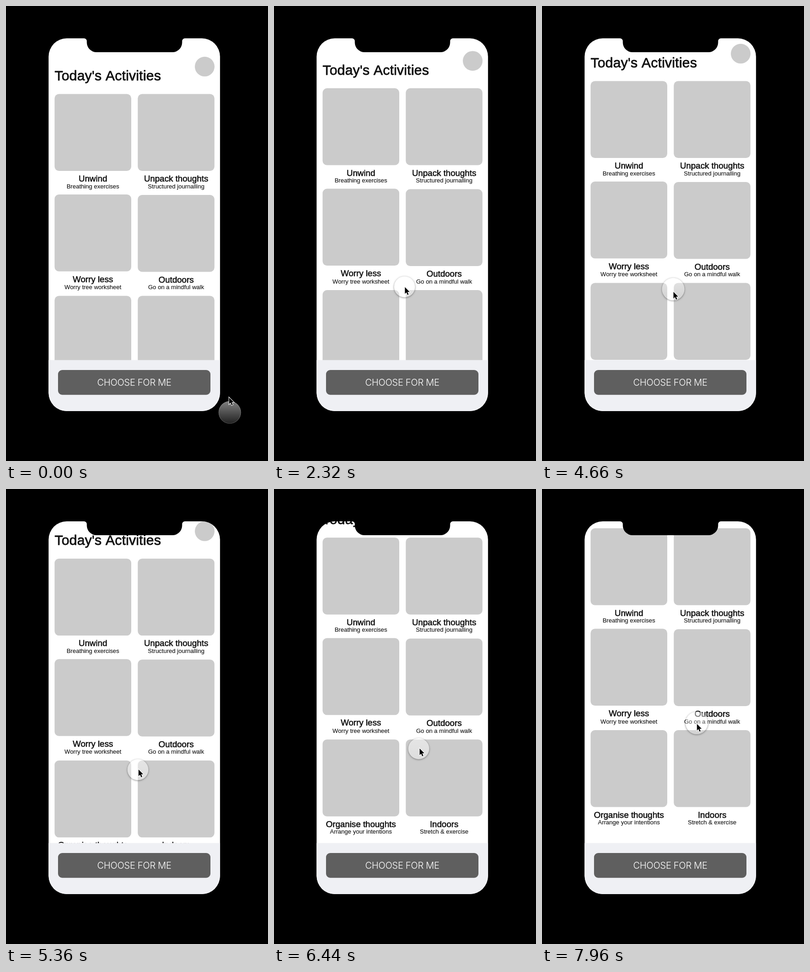
An HTML page with a canvas for the animation above (8000 ms loop, 569 px wide and 985 px high).

```html
<!DOCTYPE html>
<html lang="en">
<head>
<meta charset="utf-8">
<title>Today's Activities</title>
<style>
  html, body { margin: 0; width: 100%; height: 100%; overflow: hidden; background: #000; }
  canvas { display: block; width: 569px; height: 985px; }
</style>
</head>
<body>
<canvas id="stage"></canvas>
<script>
const W = 569, H = 985, LOOP = 8000;
const canvas = document.getElementById('stage');
const ctx = canvas.getContext('2d');
const dpr = window.devicePixelRatio || 1;
canvas.width = W * dpr;
canvas.height = H * dpr;

const GREY = '#cbcbcb', INK = '#111';
const SANS = '"Liberation Sans", Arial, sans-serif';
const ROW = 218.5, CARD = 166.5, TOP = 190.5;
const LAG = 60; // the touch dot trails the pointer by this many ms

const clamp = p => Math.max(0, Math.min(1, p));
const smooth = p => p * p * (3 - 2 * p);
const easeOut = p => p * (2 - p);
const mix = (a, b, p) => a + (b - a) * p;

// Pointer moves after it has arrived; drags take the page along
const MOVES = [
  { at: 1780, ms: 960, dx: 3, dy: -22, drag: true },
  { at: 3560, ms: 340, dx: 0, dy: -6, drag: true },
  { at: 4480, ms: 200, dx: 0, dy: 26 },
  { at: 5080, ms: 1840, dx: 37, dy: -77.5, drag: true },
  { at: 7700, ms: 200, dx: 14, dy: -33 }
];

function pointer(t) {
  // Arrival: a quarter arc that rises first, then swings left
  let x = 283 + 204 * (1 - smooth(clamp((t + LAG) / 1040)));
  let y = 621 + 227 * (1 - Math.min(1, t / 820)) ** 2;
  for (const { at, ms, dx, dy, drag } of MOVES) {
    const p = clamp((t - at) / ms);
    x += dx * smooth(p);
    y += dy * (drag ? p : easeOut(p));
  }
  return { x, y };
}

const scrollY = t => MOVES.filter(m => m.drag)
  .reduce((sum, m) => sum + m.dy * clamp((t - m.at) / m.ms), 0);

// 0 when hovering, 1 when held down
const ramp = (t, at) => clamp((t - at) / 40 + 1);
const press = t => ramp(t, 1400) - ramp(t, 4520) + ramp(t, 4840) - ramp(t, 7200);

const LEFT = [
  ['Unwind', 'Breathing exercises'],
  ['Worry less', 'Worry tree worksheet', -1],
  ['Organise thoughts', 'Arrange your intentions']
];
const RIGHT = [
  ['Unpack thoughts', 'Structured journalling'],
  ['Outdoors', 'Go on a mindful walk'],
  ['Indoors', 'Stretch & exercise']
];

function box(x, y, w, h, r, fill) {
  ctx.beginPath();
  ctx.roundRect(x, y, w, h, r);
  ctx.fillStyle = fill;
  ctx.fill();
}

function disc(x, y, r, fill) {
  ctx.beginPath();
  ctx.arc(x, y, r, 0, Math.PI * 2);
  ctx.fillStyle = fill;
  ctx.fill();
}

// A thin stroke gives the medium weight
function label(text, x, y, font, { align = 'center', bold = 0, color = INK, spacing = 0 } = {}) {
  ctx.font = font;
  ctx.textAlign = align;
  ctx.letterSpacing = spacing + 'px';
  ctx.fillStyle = ctx.strokeStyle = color;
  ctx.fillText(text, x, y);
  if (bold) {
    ctx.lineWidth = bold;
    ctx.lineJoin = 'round';
    ctx.strokeText(text, x, y);
  }
}

function column(cards, x) {
  const mid = x + CARD / 2;
  cards.forEach(([title, note, nudge = 0], i) => {
    const top = TOP + i * ROW;
    box(x, top + nudge, CARD, CARD, 9.5, GREY);
    label(title, mid, top + nudge + 189.5, '18.6px ' + SANS, { bold: 0.6 });
    label(note, mid, top + 204.2, '13px ' + SANS, { bold: 0.1 });
  });
}

function notch() {
  ctx.beginPath();
  ctx.moveTo(168, 68);
  ctx.lineTo(168, 70);
  ctx.arcTo(175.5, 70, 175.5, 78, 6);
  ctx.arcTo(175.5, 100, 200, 100, 21);
  ctx.arcTo(382.5, 100, 382.5, 78, 21);
  ctx.arcTo(382.5, 70, 390, 70, 6);
  ctx.lineTo(390, 70);
  ctx.lineTo(390, 68);
  ctx.fillStyle = '#000';
  ctx.fill();
}

function phone(scroll) {
  ctx.save();
  ctx.beginPath();
  ctx.roundRect(92.5, 70, 372.3, 807, 39.5);
  ctx.clip();
  ctx.fillStyle = '#fff';
  ctx.fillRect(92, 70, 373, 807);

  ctx.save();
  ctx.translate(0, scroll);
  label("Today's Activities", 105.5, 161, '30px ' + SANS, { align: 'left', bold: 0.8, spacing: 0.2 });
  disc(431.5, 131.2, 21.4, GREY);
  column(LEFT, 105.5);
  column(RIGHT, 286.2);
  ctx.restore();

  ctx.fillStyle = '#eff0f4';
  ctx.fillRect(92, 766.5, 373, 111);
  box(113, 788, 331, 53.7, 9, '#5f5f5f');
  label('CHOOSE FOR ME', 278.6, 822.3, '300 20px Inter, "Liberation Sans", sans-serif',
    { color: '#fff', spacing: -0.3 });
  notch();
  ctx.restore();
}

function dot(x, y, held) {
  const r = mix(24.3, 22.6, held);
  // Shadow stays outside the glass
  ctx.save();
  ctx.beginPath();
  ctx.rect(x - 40, y - 40, 80, 80);
  ctx.arc(x, y, r, 0, Math.PI * 2);
  ctx.clip('evenodd');
  ctx.shadowColor = 'rgba(0,0,0,.5)';
  ctx.shadowBlur = 4 * dpr;
  ctx.shadowOffsetY = dpr;
  disc(x, y, r - 0.3, '#aaa');
  ctx.restore();

  const glass = ctx.createLinearGradient(0, y - r, 0, y + r);
  glass.addColorStop(0, 'rgba(255,255,255,.5)');
  glass.addColorStop(1, `rgba(255,255,255,${mix(0.13, 0.36, held)})`);
  disc(x, y, r, glass);
  ctx.beginPath();
  ctx.arc(x, y, r - 0.4, 0, Math.PI * 2);
  ctx.lineWidth = 0.8;
  ctx.strokeStyle = 'rgba(255,255,255,.25)';
  ctx.stroke();
}

function arrow(x, y) {
  ctx.save();
  ctx.translate(x - 0.5, y);
  const shape = new Path2D('M0 0V14.4L3.3 11.3L5.6 16.8L8 15.8L5.7 10.4H10.2Z');
  ctx.lineJoin = 'miter';
  ctx.lineWidth = 2;
  ctx.strokeStyle = '#fff';
  ctx.stroke(shape);
  ctx.fillStyle = '#000';
  ctx.fill(shape);
  ctx.restore();
}

function draw(t) {
  ctx.setTransform(dpr, 0, 0, dpr, 0, 0);
  ctx.fillStyle = '#000';
  ctx.fillRect(0, 0, W, H);
  phone(scrollY(t));
  const tip = pointer(t), trail = pointer(t - LAG);
  dot(trail.x - 1, trail.y - 2, press(t));
  arrow(tip.x, tip.y);
}

const start = performance.now();
function tick() {
  draw((performance.now() - start) % LOOP);
  requestAnimationFrame(tick);
}
tick();
</script>
</body>
</html>
```
